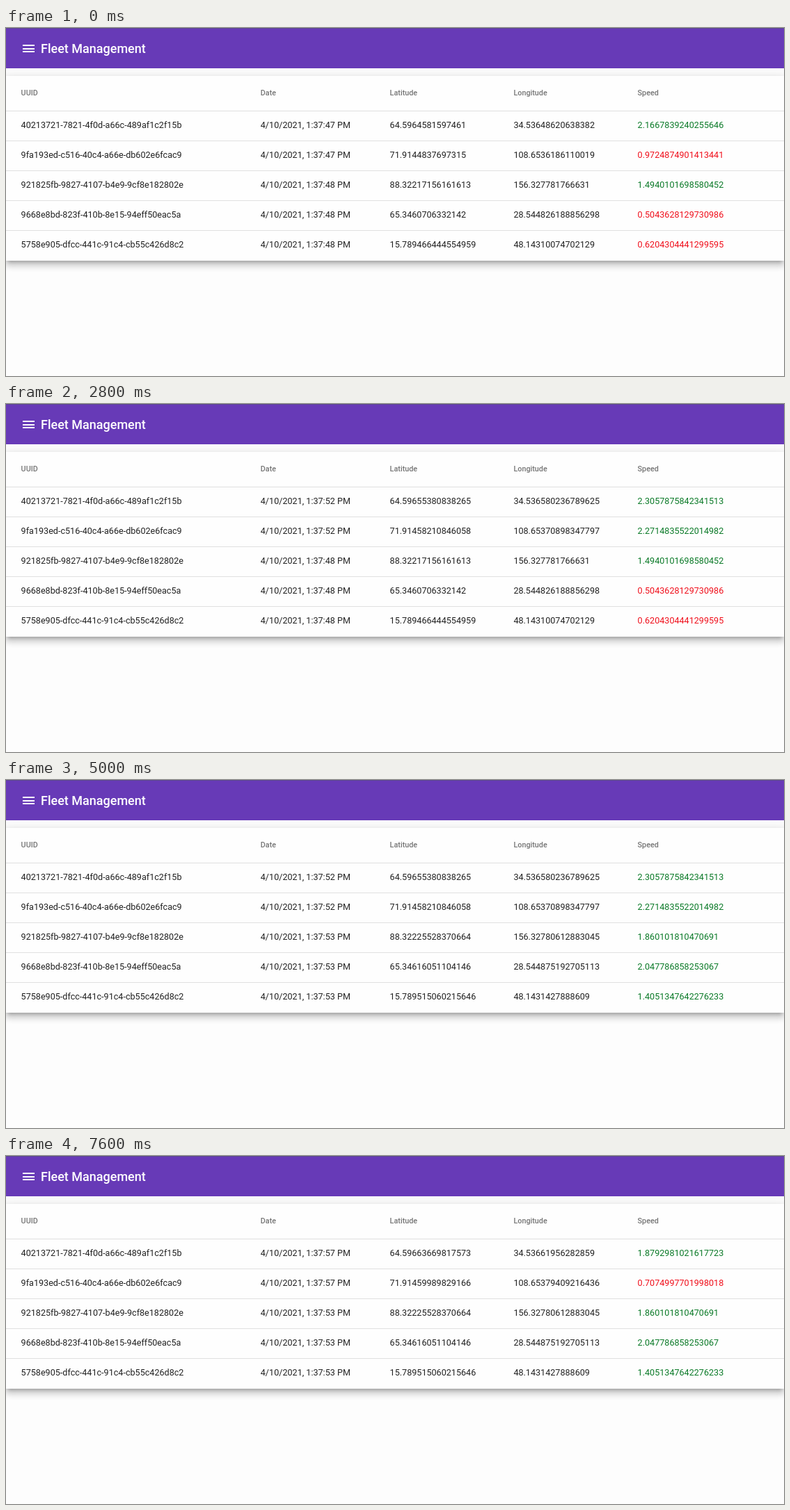
Recreate the animation shown at these times as an HTML page. Size 1118 px wide and 501 px high, loop 8000 ms.

```html
<!DOCTYPE html>
<html lang="en">
<head>
<meta charset="utf-8">
<title>Fleet Management</title>
<style>
  html, body { margin: 0; width: 100%; height: 100%; overflow: hidden; background: #fdfdfd; }
  .card {
    position: absolute; left: 0; top: 69px; width: 1118px; height: 266px; background: #fefefe;
    box-shadow: 0 4.5px 4.5px -2.7px rgba(0,0,0,.2), 0 7.2px 9px .9px rgba(0,0,0,.14),
                0 2.7px 12.6px 1.8px rgba(0,0,0,.12);
  }
  svg { position: absolute; left: 0; top: 0; font: 12.6px Roboto, sans-serif; fill: rgba(0,0,0,.87); }
  .head { font-size: 10.8px; font-weight: 500; fill: rgba(0,0,0,.54); }
  .title { font-size: 18px; font-weight: 500; fill: #fff; }
  .fast { fill: #0b7a28; }
  .slow { fill: #f0101c; }
</style>
</head>
<body>
<div class="card"></div>
<svg id="stage" width="1118" height="501" viewBox="0 0 1118 501">
  <rect width="1118" height="58" fill="#673ab7"/>
  <rect width="1118" height="1" fill="#5c4a8a"/>
  <path d="M24 24h17v2H24zM24 29h17v2H24zM24 33h17v2H24z" fill="#fff"/>
  <text class="title" x="50" y="36">Fleet Management</text>
  <path d="M0 119.5h1118M0 162.5h1118M0 205.5h1118M0 248.5h1118M0 291.5h1118" stroke="#e0e0e0"/>
</svg>
<script>
const LOOP = 8000;
const COLUMNS = [21.6, 365.8, 551.6, 729.4, 907.6];
const stage = document.getElementById('stage');

// Each reading: start time in ms, seconds of the clock, latitude, longitude, speed.
const vehicles = [
  ['40213721-7821-4f0d-a66c-489af1c2f15b',
    [0, 47, '64.5964581597461', '34.53648620638382', '2.1667839240255646'],
    [1800, 52, '64.59655380838265', '34.536580236789625', '2.3057875842341513'],
    [6800, 57, '64.59663669817573', '34.53661956282859', '1.8792981021617723']],
  ['9fa193ed-c516-40c4-a66e-db602e6fcac9',
    [0, 47, '71.9144837697315', '108.6536186110019', '0.9724874901413441'],
    [2000, 52, '71.91458210846058', '108.65370898347797', '2.2714835522014982'],
    [7000, 57, '71.91459989829166', '108.65379409216436', '0.7074997701998018']],
  ['921825fb-9827-4107-b4e9-9cf8e182802e',
    [0, 48, '88.32217156161613', '156.327781766631', '1.4940101698580452'],
    [3200, 53, '88.32225528370664', '156.32780612883045', '1.860101810470691']],
  ['9668e8bd-823f-410b-8e15-94eff50eac5a',
    [0, 48, '65.3460706332142', '28.544826188856298', '0.5043628129730986'],
    [3200, 53, '65.34616051104146', '28.544875192705113', '2.047786858253067']],
  ['5758e905-dfcc-441c-91c4-cb55c426d8c2',
    [0, 48, '15.789466444554959', '48.14310074702129', '0.6204304441299595'],
    [3200, 53, '15.789515060215646', '48.1431427888609', '1.4051347642276233']]
];

function addText(x, y, text = '', className = '') {
  const node = document.createElementNS('http://www.w3.org/2000/svg', 'text');
  node.setAttribute('x', x);
  node.setAttribute('y', y);
  node.setAttribute('class', className);
  node.textContent = text;
  return stage.appendChild(node);
}

['UUID', 'Date', 'Latitude', 'Longitude', 'Speed']
  .forEach((label, i) => addText(COLUMNS[i], 97, label, 'head'));

const rows = vehicles.map(([id, ...readings], i) => ({
  readings,
  cells: COLUMNS.map((x, c) => addText(x, 144 + 43 * i, c ? '' : id))
}));

function draw(time) {
  for (const row of rows) {
    const reading = row.readings.filter(r => r[0] <= time).pop();
    if (reading === row.shown) continue;
    row.shown = reading;
    const [, seconds, latitude, longitude, speed] = reading;
    [`4/10/2021, 1:37:${seconds} PM`, latitude, longitude, speed]
      .forEach((text, i) => row.cells[i + 1].textContent = text);
    row.cells[4].setAttribute('class', speed < 1 ? 'slow' : 'fast');
  }
}

const start = performance.now();
function tick() {
  draw((performance.now() - start) % LOOP);
  requestAnimationFrame(tick);
}
tick();
</script>
</body>
</html>
```
